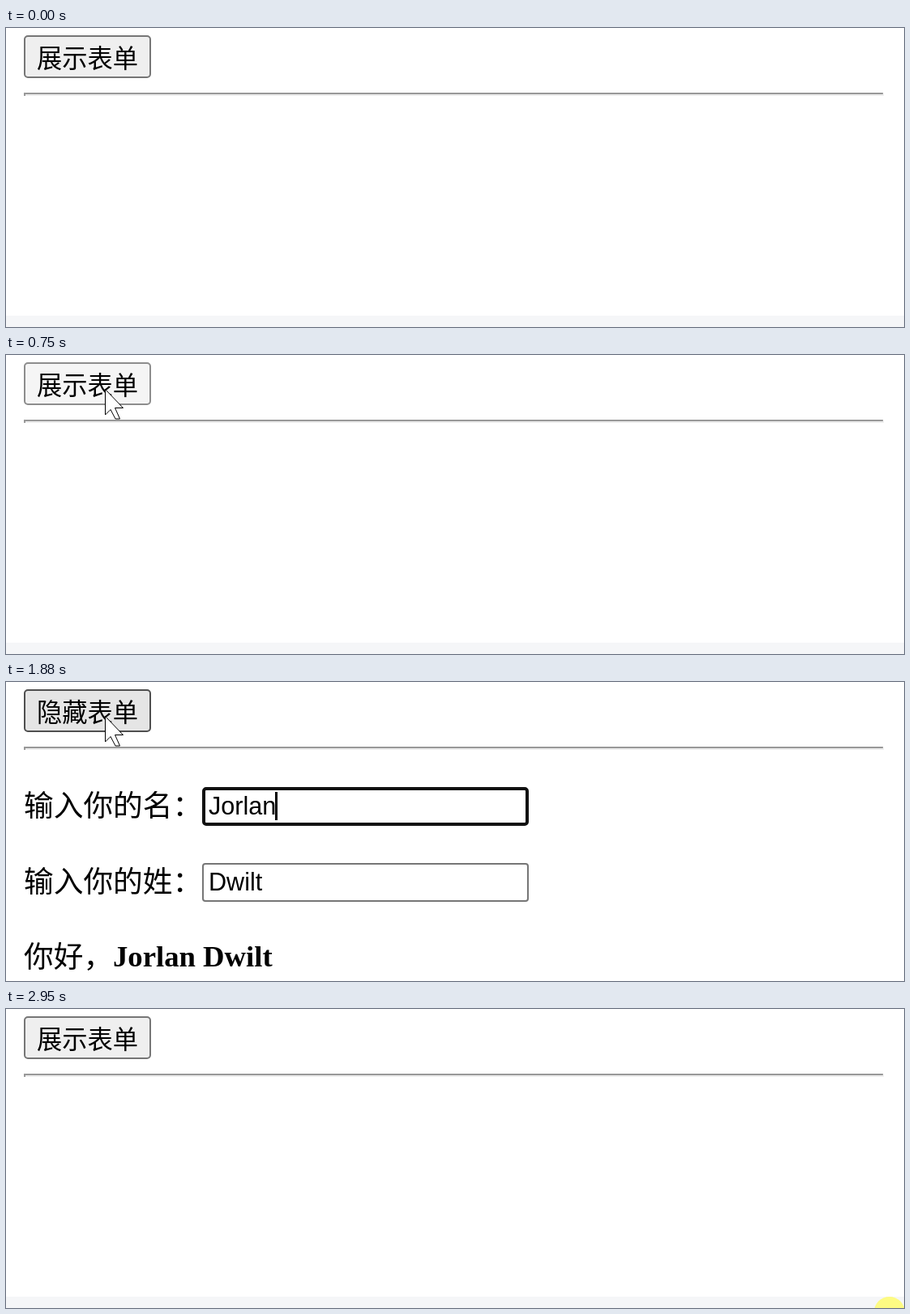
Animation of 1108x370 px, one loop 3.08 s. Source, as an HTML page:

```html
<!DOCTYPE html>
<html lang="zh-CN">
<head>
<meta charset="utf-8">
<title>展示表单</title>
<style>
  html, body { margin: 0; width: 100%; height: 100%; overflow: hidden; background: #fff; }
  svg { display: block; }
  text { font-family: "Noto Sans CJK SC", "Noto Sans CJK", sans-serif; font-size: 36.7px; }
  #label { font-size: 31.25px; }
  .value { font-family: "Liberation Sans", Arial, sans-serif; font-size: 30.6px; }
  .name { font-family: "Liberation Serif", "Times New Roman", serif; font-weight: bold; }
  .input { fill: #fff; stroke: #767676; stroke-width: 2; }
  .focus { fill: #fff; stroke: #101010; stroke-width: 4; }
</style>
</head>
<body>
<svg width="1108" height="370" viewBox="0 0 1108 370">
  <rect id="button" x="23" y="10" width="155" height="51" rx="4" stroke-width="2"/>
  <text id="label" x="38" y="49.3"></text>
  <path id="ruleLight" stroke="#ececec" stroke-width="2" fill="none"/>
  <path id="ruleDark" stroke="#999" stroke-width="2" fill="none"/>

  <g id="form">
    <text x="22" y="166">输入你的名：</text>
    <rect id="plain" class="input" x="243" y="131" width="401" height="46" rx="3"/>
    <rect id="focus" class="focus" x="244" y="132" width="399" height="44" rx="3"/>
    <text class="value" x="250" y="164">Jorlan</text>
    <rect id="caret" x="332" y="136" width="3" height="35"/>
    <text x="22" y="260">输入你的姓：</text>
    <rect class="input" x="243" y="225" width="401" height="46" rx="3"/>
    <text class="value" x="250" y="258">Dwilt</text>
    <text x="22" y="353">你好，</text>
    <text class="name" x="132" y="352">Jorlan Dwilt</text>
  </g>

  <rect id="footer" y="356" width="1108" height="14" fill="#f5f6f8"/>
  <g id="scrollbar">
    <rect x="1081" width="27" height="356" fill="#f1f1f1"/>
    <rect x="1083" y="11" width="25" height="269" fill="#c1c1c1"/>
    <path d="M1092 328h18l-9 11z" fill="#505050"/>
  </g>
  <path id="cursor" d="M.5 .5V32L7 25.5L13 37H18.5L12.5 23.5H22.5Z" fill="#fff" stroke="#000"/>
  <circle id="halo" cx="1090" cy="375" r="19" fill="#fdfb83"/>
</svg>
<script>
const LOOP = 3080;
const el = id => document.getElementById(id);
const show = (id, on) => el(id).setAttribute("visibility", on ? "inherit" : "hidden");

// Pointer samples: start time, x, y; no position means off stage.
const pointer = [
  [0], [130, 916, 346], [200, 820, 306], [270, 640, 236], [340, 430, 158],
  [400, 260, 94], [470, 160, 55], [540, 126, 43], [610, 122, 42],
  [2410, 138, 42], [2480, 360, 118], [2550, 730, 236], [2620, 1070, 346], [2690]
];
const buttonLooks = {
  idle: ["#efefef", "#767676"],
  hover: ["#e5e5e5", "#4f4f4f"],
  active: ["#f5f5f5", "#8d8d8d"]
};

function draw(t) {
  const during = (from, to) => t >= from && t < to;
  const open = during(810, 2140);
  const focused = during(810, 2010);
  const scrolling = during(810, 880);

  const look = during(680, 810) || during(2010, 2140) ? "active"
    : during(470, 2480) ? "hover" : "idle";
  const [fill, stroke] = buttonLooks[look];
  el("button").setAttribute("fill", fill);
  el("button").setAttribute("stroke", stroke);
  el("label").textContent = open ? "隐藏表单" : "展示表单";

  const right = scrolling ? 1040 : 1083;
  el("ruleLight").setAttribute("d", `M22 83H${right - 1}V80`);
  el("ruleDark").setAttribute("d", `M23 84V81H${right - 1}`);

  show("form", open);
  show("plain", open && !focused);
  show("focus", focused);
  show("caret", focused && !during(1340, 1880));
  show("footer", !during(880, 2210));
  show("scrollbar", scrolling);
  show("halo", t >= 2950);

  const [, x, y] = pointer.findLast(([start]) => start <= t);
  show("cursor", x !== undefined);
  if (x !== undefined) el("cursor").setAttribute("transform", `translate(${x} ${y})`);
}

function tick() {
  draw(performance.now() % LOOP);
  requestAnimationFrame(tick);
}
tick();
</script>
</body>
</html>
```
